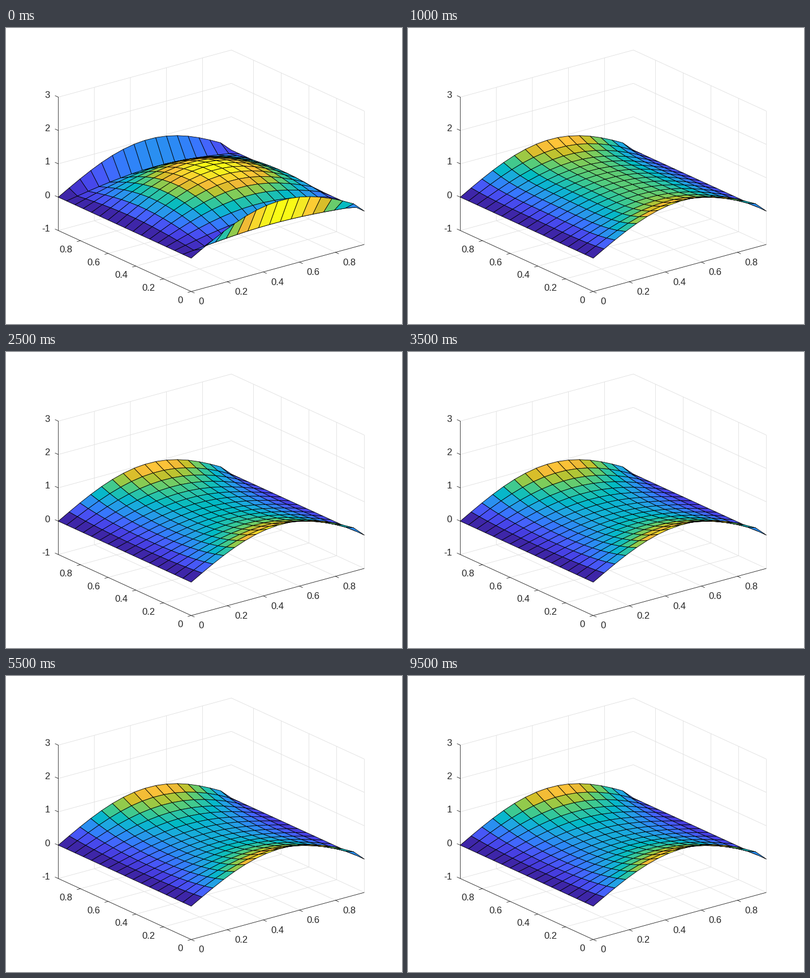
Animation, 700 px wide and 525 px high, one loop 10 s. Source, as a matplotlib script:

```python
import numpy as np
import matplotlib.pyplot as plt
from matplotlib.animation import FuncAnimation
from matplotlib.collections import LineCollection, PolyCollection
from matplotlib.colors import LinearSegmentedColormap

WIDTH, HEIGHT, DPI = 700, 525, 100
FRAMES, INTERVAL = 20, 500
STEP, CELLS, DT = 0.06, 16, 0.02
END = STEP * CELLS
Z_MIN, Z_MAX = -1, 3
INK = "#262626"
HAIRLINE = 0.83 * 72 / DPI

# Oblique projection: screen vectors of one unit along each axis
ORIGIN = np.array([327.4, 467.4])
X_UNIT = np.array([306, -83.5]) / END
Y_UNIT = np.array([-235, -108.2]) / END
Z_UNIT = np.array([0, -236.6]) / (Z_MAX - Z_MIN)

PARULA = [
    (.2422, .1504, .6603), (.2647, .1978, .7952), (.2783, .2559, .8991),
    (.2810, .3228, .9579), (.2699, .3892, .9906), (.2206, .4603, .9973),
    (.1786, .5289, .9682), (.1540, .5902, .9218), (.1248, .6459, .8883),
    (.0689, .6948, .8394), (.0067, .7312, .7660), (.1408, .7584, .6842),
    (.2161, .7843, .5923), (.3406, .8008, .4789), (.5044, .7993, .3480),
    (.6720, .7793, .2227), (.8203, .7498, .1535), (.9393, .7288, .2100),
    (.9970, .7659, .2199), (.9786, .8386, .1766), (.9597, .9135, .1423),
    (.9769, .9839, .0805),
]
cmap = LinearSegmentedColormap.from_list("parula", PARULA, N=256)


def project(x, y, z):
    x, y, z = (np.asarray(v, float)[..., None] for v in (x, y, z))
    return ORIGIN + x * X_UNIT + y * Y_UNIT + (z - Z_MIN) * Z_UNIT


def solve_heat():
    """Implicit heat flow towards equilibrium; arrays are indexed [y, x]."""
    s = np.arange(CELLS + 1) * STEP
    edge = np.sin(np.pi * s)
    u = np.outer(edge, edge)
    u[0] = u[-1] = edge
    u[:, 0] = u[:, -1] = 0

    n = CELLS - 1
    second = (2 * np.eye(n) - np.eye(n, k=1) - np.eye(n, k=-1)) / STEP**2
    eye = np.eye(n)
    laplace = np.kron(second, eye) + np.kron(eye, second)
    advance = np.linalg.inv(np.eye(n * n) + DT * laplace)
    source = np.zeros((n, n))
    source[0] = source[-1] = edge[1:-1] * DT / STEP**2

    states = [u]
    for _ in range(FRAMES - 1):
        u = u.copy()
        u[1:-1, 1:-1] = (advance @ (u[1:-1, 1:-1] + source).ravel()).reshape(n, n)
        states.append(u)
    return states


states = solve_heat()
grid_x, grid_y = np.meshgrid(*[np.arange(CELLS + 1) * STEP] * 2)

fig = plt.figure(figsize=(WIDTH / DPI, HEIGHT / DPI), dpi=DPI, facecolor="white")
ax = fig.add_axes([0, 0, 1, 1])
ax.set_xlim(0, WIDTH)
ax.set_ylim(HEIGHT, 0)
ax.axis("off")


def add_lines(paths, color, zorder):
    lines = [project(*np.transpose(p)) for p in paths]
    ax.add_collection(LineCollection(lines, colors=color, linewidths=HAIRLINE,
                                     zorder=zorder))


def add_tick(point, direction, offset, value, align):
    length = 6 * direction / np.hypot(*direction)
    ax.plot(*np.transpose([point, point + length]), color=INK, lw=HAIRLINE, zorder=2)
    ax.text(*(point + offset), f"{value:g}", ha=align, va="baseline",
            color=INK, family="Liberation Sans", size=12)


ticks = np.arange(5) * 0.2
grid = []
for t in ticks:
    grid.append([(t, 0, Z_MIN), (t, END, Z_MIN), (t, END, Z_MAX)])
    grid.append([(0, t, Z_MIN), (END, t, Z_MIN), (END, t, Z_MAX)])
for z in range(Z_MIN, Z_MAX + 1):
    grid.append([(0, END, z), (END, END, z), (END, 0, z)])
add_lines(grid, "#dfdfdf", 1)
add_lines([[(END, 0, Z_MIN), (0, 0, Z_MIN), (0, END, Z_MIN), (0, END, Z_MAX)]], INK, 2)

for t in ticks:
    add_tick(project(t, 0, Z_MIN), -Y_UNIT, (13, 23), t, "left")
    add_tick(project(0, t, Z_MIN), -X_UNIT, (-14.5, 21), t, "right")
for z in range(Z_MIN, Z_MAX + 1):
    add_tick(project(0, END, z), Y_UNIT, (-14.5, 1.5), z, "right")

surface = PolyCollection([], edgecolors="black", linewidths=HAIRLINE, zorder=3)
ax.add_collection(surface)


def update(frame):
    u = states[frame]
    p = project(grid_x, grid_y, u)
    quads = np.stack([p[:-1, :-1], p[:-1, 1:], p[1:, 1:], p[1:, :-1]], axis=2)
    # Far cells first, each coloured by its nearest corner
    surface.set_verts(quads[::-1, ::-1].reshape(-1, 4, 2))
    level = (u - u.min()) / (u.max() - u.min())
    surface.set_facecolor(cmap(level[:-1, :-1][::-1, ::-1].ravel()))
    return (surface,)


anim = FuncAnimation(fig, update, frames=FRAMES, interval=INTERVAL,
                     repeat=True, repeat_delay=0)
plt.show()
```
